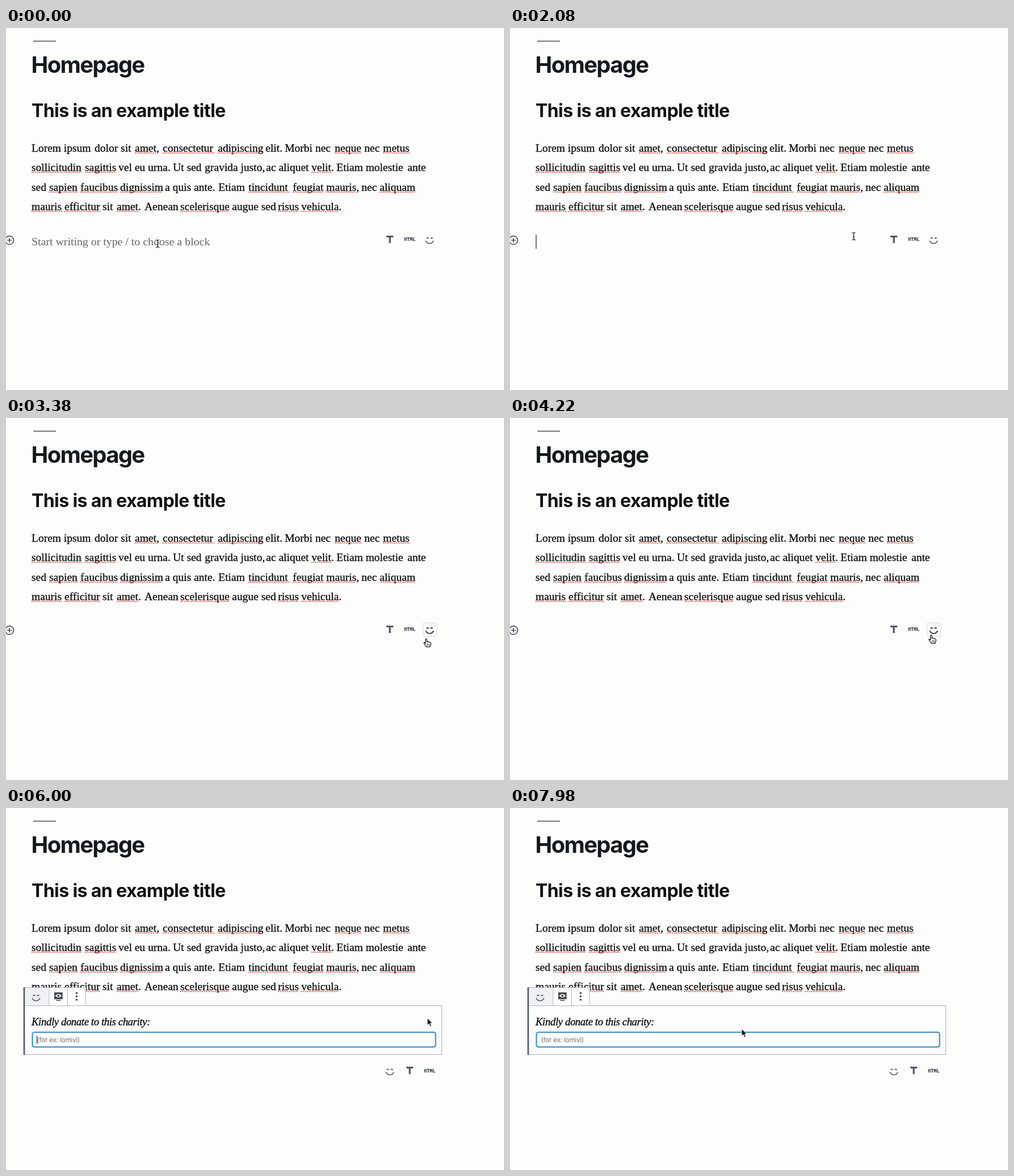
Write an HTML page that moves like this. It is 877 px wide and 638 px high and loops after 8 s.

```html
<!DOCTYPE html>
<html lang="en">
<head>
<meta charset="utf-8">
<title>Block editor</title>
<style>
  html, body { margin: 0; width: 100%; height: 100%; overflow: hidden; background: #fdfdfc; }
  svg { display: block; width: 877px; height: 638px; }
  text { white-space: pre; }
  .head { font-family: Inter, sans-serif; font-weight: 700; }
  .body { font-family: "Liberation Serif", serif; font-size: 19.5px; fill: #0c0c0e; stroke: #0c0c0e; stroke-width: .3px; }
  .prompt { font-size: 19.85px; fill: #65676b; stroke: none; }
  .label { font-size: 18.8px; font-style: italic; letter-spacing: -.41px; stroke-width: .35px; }
  .tag { font: 700 8.4px "Liberation Mono", monospace; text-anchor: middle; stroke: currentColor; stroke-width: .35px; }
  .hint { font: 11.4px Inter, sans-serif; letter-spacing: -.1px; fill: #6a6e74; }
  .spell { stroke: #e2574a; stroke-width: 2; stroke-dasharray: 1.8 1.4; }
  .caret { stroke: #26282c; stroke-width: 1.3; }
  .icons { color: #50555f; }
  .hover { color: #121417; }
  .hover rect { fill: #fefefe; stroke: #d3d7de; }
</style>
</head>
<body>
<svg viewBox="0 0 877 638">
  <defs>
    <g id="smile" fill="none" stroke="currentColor" stroke-width="1.6" stroke-linecap="round">
      <path d="M-5-2.3q1.5-2 3 0M2-2.3q1.5-2 3 0M-6.6 2.2C-4.5 8.2 4.5 8.2 6.6 2.2"/>
    </g>
    <path id="tee" fill="currentColor" d="M-6-6.5H6v3H1.6V6.5H-1.6V-3.5H-6z"/>
    <text id="html" class="tag" y="3" fill="currentColor">HTML</text>
    <path id="beamLine" fill="none" d="M-3.2-6.5Q0-6.5 0-4.5Q0-6.5 3.2-6.5M0-4.5V4.5M-3.2 6.5Q0 6.5 0 4.5Q0 6.5 3.2 6.5M-1.7 1.5H1.7"/>
  </defs>

  <path d="M48 23.3H88" stroke="#4d5157" stroke-width="1.6"/>
  <text class="head" x="44.5" y="78.5" font-size="39.8" letter-spacing="-1.6" fill="#14191e">Homepage</text>
  <text class="head" x="45" y="157" font-size="32" letter-spacing="-.6" fill="#101114">This is an example title</text>
  <g id="copy"></g>

  <g id="idle">
    <g fill="none" stroke="#4a505c" stroke-width="1.7">
      <circle cx="6" cy="374" r="7.4"/><path d="M2 374h8M6 370v8"/>
    </g>
    <g class="icons">
      <use href="#tee" x="676" y="372.5"/><use href="#html" x="711" y="372"/><use href="#smile" x="746" y="373"/>
    </g>
  </g>
  <text id="prompt" class="body prompt" x="45" y="383">Start writing or type / to choose a block</text>
  <path id="caret" class="caret" d="M46 364.5V389"/>

  <g id="hoverT" class="hover"><rect x="664.5" y="361" width="24" height="24" rx="3"/><use href="#tee" x="676" y="372.5"/></g>
  <g id="hoverHtml" class="hover"><rect x="699" y="361" width="24" height="24" rx="3"/><use href="#html" x="711" y="372"/></g>
  <g id="hoverSmile" class="hover"><rect x="734.3" y="361" width="24" height="24" rx="3"/><use href="#smile" x="746" y="373"/></g>

  <g id="block">
    <rect x="32.5" y="348.5" width="735" height="86" fill="#fdfdfd" stroke="#a7afb6"/>
    <rect x="32.5" y="316.5" width="108" height="32" fill="#fdfdfd" stroke="#b1b8bf"/>
    <path d="M34 317H76V348H34z" fill="#eff1f4"/>
    <path d="M76 316.5v32M108.5 316.5v32" stroke="#b1b8bf"/>
    <path d="M32 316V435" stroke="#4f5863" stroke-width="2.6"/>
    <g class="icons">
      <use href="#smile" x="53" y="333"/>
      <use href="#smile" x="676" y="463.5"/><use href="#tee" x="711" y="462.5"/><use href="#html" x="746" y="463"/>
    </g>
    <g fill="#40464f">
      <path d="M85 325h14.5v12H85zM88 338.2h8.5v1.6H88z"/>
      <path d="M86.5 331q5.7-6.5 11.4 0q-5.7 6.5-11.4 0z" fill="#fdfdfd"/>
      <circle cx="92.2" cy="331" r="2"/>
      <circle cx="124.3" cy="326" r="1.8"/><circle cx="124.3" cy="332" r="1.8"/><circle cx="124.3" cy="338" r="1.8"/>
    </g>
    <text class="body label" x="45" y="383">Kindly donate to this charity:</text>
    <rect id="field" x="46.5" y="395.3" width="710" height="26" rx="3.5" fill="#fefefe" stroke="#2a8bc0"/>
    <text class="hint" x="54.5" y="412.5">(for ex: lomivi)</text>
    <path id="fieldCaret" class="caret" d="M54.5 401.5V415.5"/>
  </g>

  <g id="pointer">
    <g id="beam">
      <use href="#beamLine" stroke="#fff" stroke-width="2.6"/>
      <use href="#beamLine" stroke="#111" stroke-width="1.2"/>
    </g>
    <g id="hand" stroke="#111" stroke-width="1.2" stroke-linejoin="round" stroke-linecap="round">
      <path fill="#fff" d="M-3.4 1.2V-5.5Q-3.4-7.2-2.2-7.2T-.9-5.5V-1.8Q.6-3 1.7-1.4Q3.2-2.3 4.1-.7Q6.2-1.1 6.2 1.2Q6.2 4 4.6 7.2H-2Q-2.6 5.6-4.2 3.8T-6.2.2Q-5.4-1.4-3.4 1.2z"/>
      <path fill="none" stroke-width=".8" d="M-.4 2V4.8M1.6 2V4.8M3.6 2V4.8"/>
    </g>
    <path id="arrow" fill="#0a0a0a" stroke="#fff" stroke-width=".9" d="M-4-7.6V4.9L-1.1 2.2 1 7.2 3.2 6.2 1.1 1.4H5z"/>
  </g>
</svg>
<script>
const LOOP = 8000, OPEN = 5440;
const $ = id => document.getElementById(id);
const svg = (tag, attrs, text = '') => {
  const el = document.createElementNS('http://www.w3.org/2000/svg', tag);
  for (const key in attrs) el.setAttribute(key, attrs[key]);
  el.textContent = text;
  return $('copy').appendChild(el);
};

// Each run: start x, text, and the end of its spelling mark if it has one.
const lines = [
  [218, [45, 'Lorem ipsum'], [156, 'dolor sit'], [227, 'amet,', 267], [276, 'consectetur', 367], [373, 'adipiscing', 452],
    [457, 'elit.'], [491, 'Morbi nec'], [579, 'neque', 626], [631, 'nec'], [664, 'metus', 712]],
  [252, [45, 'sollicitudin', 133], [139, 'sagittis', 194], [198, 'vel eu urna.'], [294, 'Ut sed'],
    [350, 'gravida justo,'], [458, 'ac aliquet'], [538, 'velit.', 574], [582, 'Etiam molestie'], [707, 'ante']],
  [287, [45, 'sed'], [76, 'sapien', 126], [131, 'faucibus', 196], [201, 'dignissim', 275], [280, 'a quis ante.'],
    [374, 'Etiam'], [427, 'tincidunt', 500], [505, 'feugiat', 558], [564, 'mauris,', 616], [626, 'nec'], [658, 'aliquam', 720]],
  [321, [45, 'mauris', 98], [103, 'efficitur', 166], [170, 'sit'], [195, 'amet.', 234], [244, 'Aenean'],
    [307, 'scelerisque', 393], [398, 'augue sed'], [479, 'risus', 515], [520, 'vehicula.', 585]]
];
for (const [y, ...runs] of lines)
  for (const [x, word, end] of runs) {
    svg('text', { class: 'body', x, y }, word);
    if (end) svg('path', { class: 'spell', d: `M${x} ${y + 2.2}H${end}` });
  }

const play = (id, frames) => $(id).animate(frames, { duration: LOOP, iterations: Infinity });

// Visible only within the given [from, to] spans.
function show(id, ...spans) {
  const frames = [{ offset: 0, opacity: 0, easing: 'step-end' }];
  for (const [from, to] of spans) {
    if (from === 0) frames.pop();
    frames.push({ offset: from / LOOP, opacity: 1, easing: 'step-end' });
    if (to < LOOP) frames.push({ offset: to / LOOP, opacity: 0, easing: 'step-end' });
  }
  frames.push({ offset: 1, opacity: frames[frames.length - 1].opacity });
  play(id, frames);
}

show('prompt', [0, 1300]);
show('caret', [1300, 2800], [4300, OPEN]);
show('idle', [0, OPEN]);
show('block', [OPEN, LOOP]);
show('fieldCaret', [OPEN, 6950]);
show('hoverT', [2320, 2520]);
show('hoverHtml', [2560, 3060]);
show('hoverSmile', [3360, OPEN]);
show('beam', [0, 2320], [6420, 7850]);
show('hand', [2320, OPEN]);
show('arrow', [OPEN, 6420], [7850, LOOP]);

play('field', [
  { offset: 0, strokeWidth: '1px' },
  { offset: 5490 / LOOP, strokeWidth: '1px' },
  { offset: 5560 / LOOP, strokeWidth: '2px' },
  { offset: 1, strokeWidth: '2px' }
]);

const path = [
  [0, 267, 380], [1380, 267, 380], [1700, 400, 375], [2080, 605, 367], [2340, 674, 378], [2480, 688, 389],
  [2680, 711, 394], [2900, 712, 394], [3240, 735, 394], [3500, 748, 398], [3900, 746, 394], [4220, 744, 390],
  [4800, 744, 388], [5400, 746, 379], [5460, 746, 378], [6150, 746, 378], [6600, 730, 412], [7000, 640, 411],
  [7440, 530, 408], [7800, 425, 402], [7960, 412, 397], [8000, 412, 397]
];
play('pointer', path.map(([t, x, y]) => ({ offset: t / LOOP, transform: `translate(${x}px, ${y}px)` })));
</script>
</body>
</html>
```
